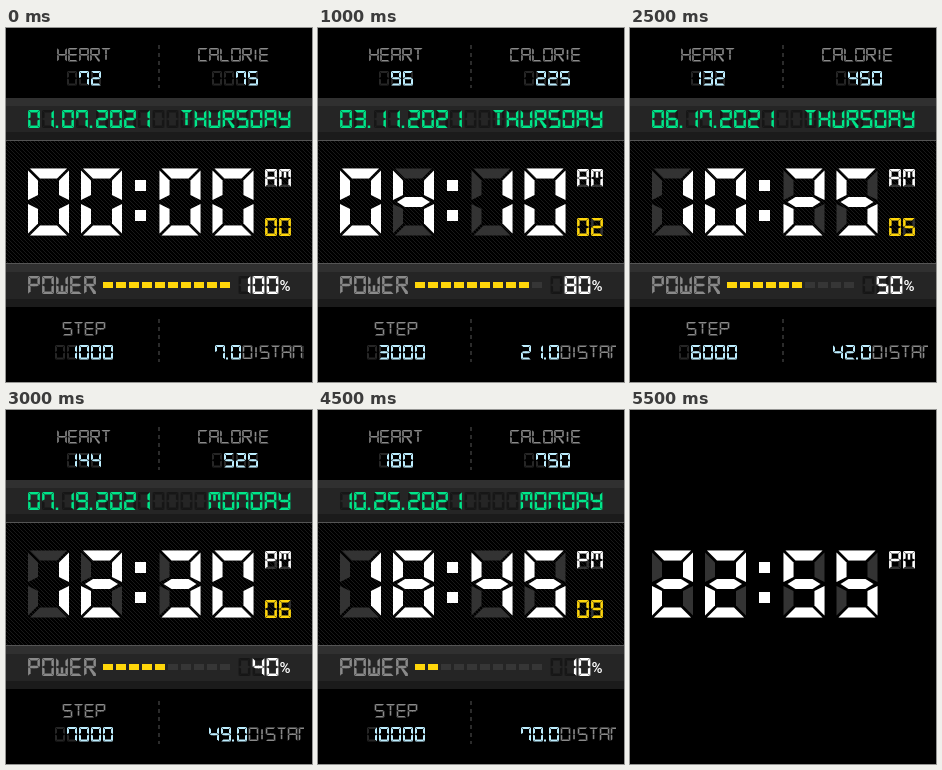
Write an HTML page with a canvas that moves like this. It is 306 px wide and 354 px high and loops after 6 s.

```html
<!DOCTYPE html>
<html lang="en">
<head>
<meta charset="utf-8">
<title>Watch face</title>
<style>
html, body { margin: 0; width: 100%; height: 100%; overflow: hidden; background: #000; }
canvas { display: block; }
</style>
</head>
<body>
<canvas id="face" width="306" height="354"></canvas>
<script>
const ctx = document.getElementById('face').getContext('2d');
const STEP = 500, STEPS = 12;
const WHITE = '#fff', GREY = '#8a8a8a', BLUE = '#bdeeff', GREEN = '#00e68a', YELLOW = '#ffd60a';
const DIM = '#333', SHADE = '#161616';
const DAYS = ['SUNDAY', 'MONDAY', 'TUESDAY', 'WEDNESDAY', 'THURSDAY', 'FRIDAY', 'SATURDAY'];

// Lit segments: a-f ring, g h middle, j m upper and lower centre, n slanted leg
const GLYPHS = {
  0: 'abcdef', 1: 'bc', 2: 'abdegh', 3: 'abcdgh', 4: 'bcfgh', 5: 'acdfgh',
  6: 'acdefgh', 7: 'abcf', 8: 'abcdefgh', 9: 'abcdfgh',
  A: 'abcefgh', C: 'adef', D: 'abcdef', E: 'adefgh', F: 'aefgh', H: 'bcefgh', I: 'jm',
  L: 'def', M: 'abcefj', N: 'abcef', O: 'abcdef', P: 'abefgh', R: 'abefghn', S: 'acdfgh',
  T: 'ajm', U: 'bcdef', W: 'bcdefm', Y: 'bcdfgh'
};

// Font: w, h glyph size, t stroke, s gap, cell advance, dot advance
const LABEL = { w: 9.6, h: 13.5, t: 1.6, s: 0.25, cell: 11 };
const VALUE = { w: 10, h: 14.5, t: 2, s: 0.3, cell: 12, dot: 4 };
const TEXT = { w: 11.8, h: 18, t: 2.5, s: 0.35, cell: 14, dot: 6 };
const CLOCK = { w: 41, h: 67, t: 10, s: 2, cell: 53 };

const pad = (n, len = 2) => String(n).padStart(len, '0');

function rect(x, y, w, h, color) {
  ctx.fillStyle = color;
  ctx.fillRect(x, y, w, h);
}

function segments({ w, h, t, s }) {
  const m = h / 2, c = w / 2, q = t / 2;
  const flipX = p => p.map(([x, y]) => [w - x, y]);
  const flipY = p => p.map(([x, y]) => [x, h - y]);
  const a = [[s, 0], [w - s, 0], [w - t - s, t], [t + s, t]];
  const f = [[0, s], [t, t + s], [t, m - q - s], [0, m - s]];
  const g = [[2 * s, m], [t + s, m - q], [c + .5, m - q], [c + .5, m + q], [t + s, m + q]];
  const j = [[c - q, t + s], [c + q, t + s], [c + q, m - s], [c - q, m - s]];
  const n = [[c - q, m + q], [c + q, m + q], [w, h - t], [w, h], [w - t, h]];
  const b = flipX(f);
  return { a, b, c: flipY(b), d: flipY(a), e: flipY(f), f, g, h: flipX(g), j, m: flipY(j), n };
}
for (const font of [LABEL, VALUE, TEXT, CLOCK]) font.seg = segments(font);

function glyph(ch, x, y, font, color) {
  ctx.fillStyle = color;
  for (const name of GLYPHS[ch]) {
    ctx.beginPath();
    for (const [px, py] of font.seg[name]) ctx.lineTo(x + px, y + py);
    ctx.fill();
  }
}

const advance = (ch, font) =>
  ch === '.' ? font.dot : ch === 'I' ? font.cell * 0.55 : font.cell;

const width = (str, font) => [...str].reduce((sum, ch) => sum + advance(ch, font), 0);

// Draws from the left and returns the end position
function write(str, x, y, font, color) {
  for (const ch of str) {
    const step = advance(ch, font);
    if (ch === '.') rect(x + step / 2 - font.t / 2 - 1, y + font.h - font.t, font.t, font.t, color);
    else glyph(ch, x + (step - font.w) / 2, y, font, color);
    x += step;
  }
  return x;
}

const writeRight = (str, right, y, font, color) =>
  write(str, right - width(str, font), y, font, color);

const writeMid = (str, mid, y, font, color) =>
  write(str, mid - width(str, font) / 2, y, font, color);

function counter(label, n, digits, mid, valueMid, y) {
  writeMid(label, mid, y, LABEL, GREY);
  const right = valueMid + digits * VALUE.cell / 2;
  writeRight('0'.repeat(digits), right, y + 23, VALUE, '#262626');
  writeRight(String(n), right, y + 23, VALUE, BLUE);
}

function divider(y) {
  for (let k = 0; k < 43; k += 8) rect(152, y + k, 2, Math.min(4, 43 - k), '#2b2b2b');
}

function bar(y, h) {
  rect(0, y, 306, 8, '#303030');
  rect(0, y + 8, 306, h - 16, '#252525');
  rect(0, y + h - 8, 306, 8, '#1b1b1b');
}

function panels() {
  ctx.save();
  ctx.beginPath();
  ctx.rect(0, 113, 306, 122);
  ctx.clip();
  ctx.strokeStyle = '#191919';
  ctx.lineWidth = 1;
  ctx.beginPath();
  for (let x = -124; x < 306; x += 4) {
    ctx.moveTo(x, 113);
    ctx.lineTo(x + 122, 235);
  }
  ctx.stroke();
  ctx.restore();
  bar(70, 42);
  rect(0, 112, 306, 1, '#555');
  rect(0, 235, 306, 1, '#555');
  bar(236, 43);
}

function clock(hour, minute) {
  [...pad(hour) + pad(minute)].forEach((ch, k) => {
    const x = [22, 75, 153.5, 206.5][k];
    glyph('0', x, 140.5, CLOCK, DIM);
    glyph(ch, x, 140.5, CLOCK, WHITE);
  });
  rect(129, 152, 11, 11, WHITE);
  rect(129, 182, 11, 11, WHITE);
  write('00', 258, 141, TEXT, DIM);
  write(hour < 12 ? 'AM' : 'PM', 258, 141, TEXT, WHITE);
}

function dateRow(i) {
  const day = 7 + 2 * i;
  const name = DAYS[new Date(2021, i, day).getDay()];
  write('00.00.0000', 21, 82, TEXT, SHADE);
  writeRight('0'.repeat(10), 285.5, 82, TEXT, SHADE);
  write(`${pad(i + 1)}.${pad(day)}.2021`, 21, 82, TEXT, GREEN);
  writeRight(name, 285.5, 82, TEXT, GREEN);
}

function powerRow(percent) {
  write('POWER', 21, 248, TEXT, GREY);
  const lit = percent / 10 + 1;
  for (let k = 0; k < 10; k++) rect(97 + 13 * k, 254, 10, 6, k < lit ? YELLOW : '#363636');
  writeRight('000', 273.5, 248, TEXT, SHADE);
  writeRight(String(percent), 273.5, 248, TEXT, WHITE);
  ctx.fillStyle = WHITE;
  ctx.font = '500 15px Roboto, sans-serif';
  ctx.fillText('%', 273.5, 263);
}

function distance(km) {
  const str = km.toFixed(1);
  ctx.save();
  ctx.beginPath();
  ctx.rect(0, 290, 298, 64);
  ctx.clip();
  const end = write(str, 222 - width(str, VALUE) / 2, 317, VALUE, BLUE);
  write('DISTANCE', end, 317.5, LABEL, GREY);
  ctx.restore();
}

function draw(i) {
  rect(0, 0, 306, 354, '#000');
  const awake = i < 10;
  if (awake) panels();
  clock(2 * i, 5 * i);
  if (!awake) return;
  divider(17);
  divider(291);
  counter('HEART', 72 + 12 * i, 3, 78, 78, 20);
  counter('CALORIE', 75 * (i + 1), 4, 227.5, 229, 20);
  counter('STEP', 1000 * (i + 1), 5, 78, 78, 294);
  distance(7 * (i + 1));
  dateRow(i);
  powerRow(100 - 10 * i);
  write('00', 258, 190, TEXT, DIM);
  write(pad(i), 258, 190, TEXT, YELLOW);
}

function tick() {
  draw(Math.floor(performance.now() / STEP) % STEPS);
  requestAnimationFrame(tick);
}
tick();
</script>
</body>
</html>
```
